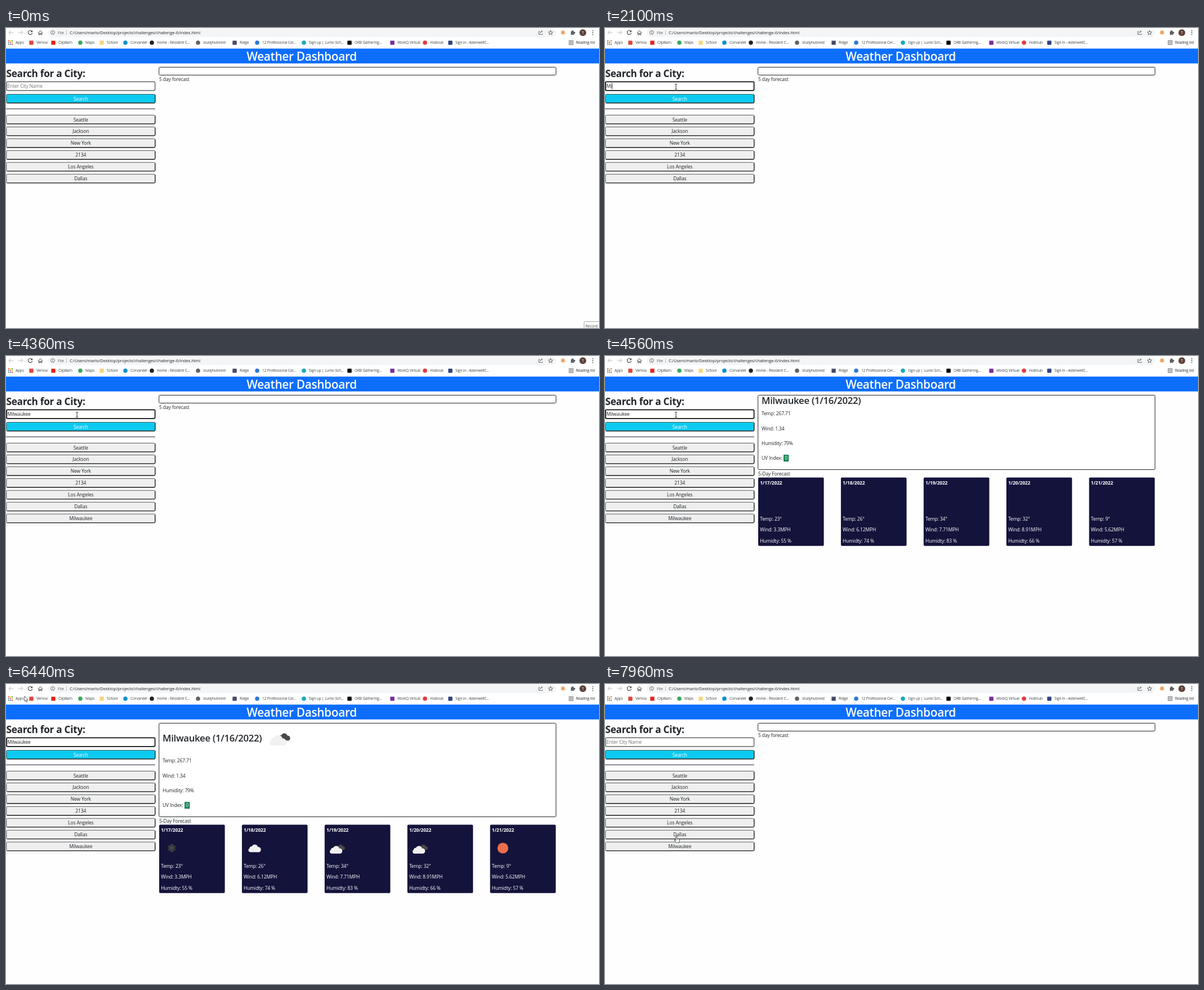
Recreate the animation shown at these times as an HTML page. Size 1053 by 532 pixels, loop 8 s.

```html
<!DOCTYPE html>
<html lang="en">
<head>
<meta charset="utf-8">
<title>Weather Dashboard</title>
<style>
html, body { margin: 0; width: 100%; height: 100%; overflow: hidden; background: #fefefe; }
svg { display: block; width: 100%; height: 100%; }
text { font-family: "Open Sans", "Noto Sans", sans-serif; letter-spacing: -.015em; white-space: pre; }
</style>
</head>
<body>
<svg id="stage" viewBox="0 0 1053 532"></svg>
<script>
const INK = '#212529';
const stage = document.getElementById('stage');

const text = (x, y, size, str, fill = INK, more = '') =>
  `<text x="${x}" y="${y}" font-size="${size}" fill="${fill}" ${more}>${str}</text>`;
const mid = (x, y, size, str, fill, more = '') => text(x, y, size, str, fill, 'text-anchor="middle" ' + more);
const rect = (x, y, w, h, fill, more = '') =>
  `<rect x="${x}" y="${y}" width="${w}" height="${h}" fill="${fill}" ${more}/>`;
const dot = (x, y, r, fill, more = '') => `<circle cx="${x}" cy="${y}" r="${r}" fill="${fill}" ${more}/>`;
const line = (d, color, width = 1, more = '') =>
  `<path d="${d}" fill="none" stroke="${color}" stroke-width="${width}" ${more}/>`;
const group = (id, body, more = '') => `<g id="${id}" ${more}>${body}</g>`;

// Browser toolbar and bookmarks
function toolbar() {
  const grey = '#5f6368', pale = '#b9bbbe';
  let s = rect(0, 0, 1053, 37, '#fff') + rect(74, 1, 903, 15, '#f4f5f6', 'rx="7.5"');
  s += line('M13 8H5M8.5 4.5L5 8L8.500 11.500', pale) + line('M22 8h8M26.500 4.500L30 8L26.500 11.500', pale);
  s += group('reload', line('M46 5.500A3.700 3.700 0 1 0 46.700 9', '#3c4043', 1.1) + '<path d="M47 3.700v3.600h-3.600z" fill="#3c4043"/>');
  s += group('stop', line('M40 5l6 6m0-6l-6 6', '#3c4043', 1.1));
  s += line('M57 8.500L61 4.500L65 8.500M58.300 8v4h1.800v-2.600h1.800V12h1.800V8', '#3c4043');
  s += dot(83, 8, 3.4, 'none', `stroke="${grey}" stroke-width=".9"`) + line('M83 7.500v2.300M83 5.800v.9', grey, .9);
  s += text(92, 10.7, 7.1, 'File', grey) + line('M107.500 4v8.500', '#aaadb1', .8);
  s += text(113, 10.7, 7.57, 'C:/Users/marlo/Desktop/projects/challenges/challenge-6/index.html', '#26282c');
  s += line('M948 6h-2v5.500h6.500v-1.500M948 9.500q.5-3.500 4-3.500m-1.500-2l2 2l-2 2', grey, .9);
  s += line('M967 4.200l1.100 2.700 2.900.2-2.200 1.900.7 2.800-2.500-1.500-2.500 1.500.7-2.800-2.200-1.900 2.900-.2z', '#3c4043', .8);
  s += dot(989, 8, 3.5, '#f0a367');
  s += rect(1003, 6, 6, 6, grey, 'rx=".7"') + dot(1006, 5.500, 1.5, grey) + dot(1009.500, 8.500, 1.4, grey);
  s += dot(1024.300, 8.300, 6, '#5d4038') + mid(1024.300, 10.700, 6.5, 'T', '#fff');
  for (const y of [4.8, 8.2, 11.6]) s += dot(1042, y, .9, '#3c4043');

  const dots = ['#ea4335', '#fbbc05', '#34a853', '#4285f4'];
  for (let i = 0; i < 9; i++) s += rect(4 + i % 3 * 3, 22 + (i / 3 | 0) * 3, 1.9, 1.9, dots[i % 4]);
  const marks = [
    [17, 'Apps'],
    [54, 'Vemox', '#e0453a'], [93, 'ClipBarn', '#e52420'], [141, 'Maps', '#3aa757', 1],
    [179, 'School', '#f6d67c'], [221, 'Corvandel', '#0a8fd3', 1], [268, 'Home - Resident C...', '#222', 1],
    [350, 'studyhubnest', '#5f6368', 1], [415, 'Ridge', '#45496a'], [455, '12 Professional Cer...', '#2d78d6', 1],
    [538, 'Sign up | Lumo Sch...', '#16a8bd', 1], [619, 'ORB Gathering...', '#000'],
    [695, 'WorkQ Virtual', '#7c2a9b'], [753, 'Hobnub', '#e4393f', 1], [798, 'Sign in - AlderwellC...', '#33407f']
  ];
  for (const [x, name, color, round] of marks) {
    if (color) s += round ? dot(x - 9, 26, 3.8, color) : rect(x - 12.700, 22.500, 7.4, 7.2, color, 'rx=".6"');
    s += text(x, 28.300, 6.45, name, '#3c4043');
  }
  s += rect(1000, 22.500, 7, 7, 'none', 'stroke="#5f6368" stroke-width=".9"');
  s += line('M1001 24.500h5M1001 26h5M1001 27.500h5', '#5f6368', .7);
  return s + text(1012, 28.300, 6.5, 'Reading list', '#26282c');
}

function button(y, label, fill = '#efefef', color = INK) {
  return rect(.8, y + .5, 264, 15.5, fill, 'rx="2" stroke="#55585b"') +
    line(`M1.500 ${y + 16}H263q1.800 0 1.800-1.800V${y + 1.5}`, '#111', 1.1) +
    mid(132.800, y + 11.5, 8.5, label, color);
}

// Weather icons, drawn around their own centre
const cloud = (fill, place = '') => `<path transform="${place}" fill="${fill}"
  d="M-11 9a5 5 0 0 1-1-9.500a4 4 0 0 1 5-4a8 8 0 0 1 15 1a6.500 6.500 0 0 1 3 12.500z"/>`;
const at = (x, y, scale, body) => `<g transform="translate(${x} ${y}) scale(${scale})">${body}</g>`;
const broken = cloud('#484848', 'translate(11 -6) scale(.7)') + cloud('#f1f1f1');
function flake() {
  let s = '';
  for (let a = 0; a < 360; a += 60)
    s += line('M0 0V-7.500M-2.500-6.500L0-4L2.500-6.500M-2-3.500L0-1.500L2-3.500', '#484848', 1.3, `transform="rotate(${a})"`);
  return s;
}

function card(i, [temp, wind, wet, icon]) {
  const x = 272 + i * 146.9;
  const rows = [`Temp: ${temp}°`, `Wind: ${wind}MPH`, `Humidty: ${wet} %`];
  return rect(x, 249.500, 116.6, 121.2, '#14133b', 'rx="2"') +
    text(x + 3.2, 262, 8.4, `1/${17 + i}/2022`, '#fff', 'font-weight="700"') +
    `<g class="icon">${at(...icon)}</g>` +
    rows.map((r, k) => text(x + 3.2, 326 + k * 19.3, 8.5, r, '#fff')).join('');
}

function report() {
  const days = [
    [23, '3.3', 55, [294.3, 291, 1, flake()]],
    [26, '6.12', 74, [441.500, 291.500, .74, cloud('#f1f1f1')]],
    [34, '7.71', 83, [586, 294, .74, broken]],
    [32, '8.91', 66, [733, 294, .74, broken]],
    [9, '5.62', 57, [882.300, 291, 1, dot(0, 0, 9.6, '#ec6e4c')]]
  ];
  const rows = ['Temp: 267.71', 'Wind: 1.34', 'Humidity: 79%', 'UV Index:'];
  return text(278, 102, 16.7, 'Milwaukee (1/16/2022)', INK, 'id="city" font-weight="600"') +
    `<g class="icon">${at(483, 100, 1, broken)}</g>` +
    group('details', rows.map((r, i) => text(278, 139.200 + i * 26.4, 8.5, r)).join('') +
      rect(317, 209, 9.3, 12.3, '#198754', 'rx="1"') + mid(321.700, 218.400, 8.5, '0', '#fff') +
      text(272, 245.500, 8.5, '5-Day Forecast') + days.map((d, i) => card(i, d)).join(''));
}

const towns = ['Seattle', 'Jackson', 'New York', '2134', 'Los Angeles', 'Dallas', 'Milwaukee'];
const hints = ['Seattle', 'Jackson', 'asdkasd', 'New York', 'Dallas'];

stage.innerHTML = rect(0, 0, 1053, 532, '#fefefe') + toolbar() +
  rect(0, 36.500, 1053, 26.3, '#0d6efd') +
  mid(525, 58.200, 20.8, 'Weather Dashboard', '#fff', 'font-weight="600"') +
  text(.5, 87, 17.2, 'Search for a City:', INK, 'font-weight="700"') +
  rect(1, 95.300, 263.6, 15.5, '#fff', 'id="box" rx="2"') +
  text(2.500, 106.300, 8.5, '', '#222', 'id="field"') + rect(0, 97.500, .8, 11, '#000', 'id="caret"') +
  button(117, 'Search', '#0dcaf0', '#fff') + rect(0, 142.600, 265, 1.6, '#6f6d79') +
  towns.map((n, i) => group('town' + i, button(154 + i * 20.95, n))).join('') +
  rect(271.700, 69.500, 705, 14, '#fff', `id="panel" rx="2" stroke="${INK}"`) +
  text(272, 93.700, 8.5, '5 day forecast', INK, 'id="empty"') + group('report', report()) +
  group('list', rect(-1, 111, 108.5, 110.5, '#000', 'opacity=".08"') + rect(0, 111, 106.5, 109, '#fff') +
    line('M0 220H106.500V111', '#c9c9c9', .7) +
    hints.map((n, i) => text(7, 129.300 + i * 19.85, 7, n, '#111')).join('')) +
  group('record', rect(1026.500, 520.500, 30, 14, '#fbfbfb', 'stroke="#aaa" rx="1"') + text(1029, 531, 6.8, 'Record', '#555')) +
  group('cursor',
    group('arrow', '<path d="M0 0V9L2.100 7.100L3.500 10.200L4.900 9.600L3.500 6.500H6.300z" fill="#fff" stroke="#222" stroke-width=".7"/>') +
    group('beam', line('M-1.800-4H-.4L0-3.500L.4-4H1.800M0-3.500V4.500M-1.800 5H-.4L0 4.500L.4 5H1.800', '#111', .9)) +
    group('hand', `<path d="M-1 1Q0-.5 1 1V4.500L5 5.500Q6 6 5.800 7.500L4.500 12H-.5L-3.800 7.500Q-3.500 6-1 8z"
      fill="#fff" stroke="#222" stroke-width=".8"/>` + line('M1.100 7V5M3 7V5.200', '#222', .6)));

const $ = id => document.getElementById(id);
const show = (id, on) => $(id).setAttribute('display', on ? 'inline' : 'none');
const icons = [...document.querySelectorAll('.icon')];

// Moves advance in even steps through their way points
const STEP = 67;
const moves = [
  { start: 70, steps: 12, path: [[1038, 527], [850, 455], [560, 330], [310, 205], [175, 130], [132, 106], [126, 103.500]] },
  { start: 6040, steps: 13, path: [[126, 103.500], [92, 76], [46, 34], [29, 18], [18, 6], [32, 6], [42.500, 7.500]] },
  { start: 7500, steps: 8, path: [[42.500, 7.500], [60, 60], [88, 140], [115, 225], [126, 266], [128, 275]] }
];
function pointer(t) {
  const m = moves.filter(m => t >= m.start).pop();
  if (!m) return null;
  const part = Math.min(1, (Math.floor((t - m.start) / STEP) + 1) / m.steps) * (m.path.length - 1);
  const i = Math.min(Math.floor(part), m.path.length - 2), f = part - i;
  return m.path[i].map((a, k) => a + (m.path[i + 1][k] - a) * f);
}

const keys = [
  [1960, 'M'], [2090, 'Mi'], [2220, 'Mil'], [2350, 'Milw'], [2490, 'Milwa'], [2640, 'Milwau'],
  [2900, 'Milwaue'], [2960, 'Milwauek'], [3230, 'Milwaue'], [3360, 'Milwau'],
  [3500, 'Milwauk'], [3630, 'Milwauke'], [3760, 'Milwaukee']
];
const RELOAD = 7160;
const blinks = [1160, 1760, 1960, 4360, 4910, 5370, 5900, 6440, 6970, RELOAD];

function draw(t) {
  const focus = t >= 1160 && t < RELOAD;
  const typed = t < RELOAD ? (keys.filter(k => t >= k[0]).pop() || [0, ''])[1] : '';
  const field = $('field'), box = $('box');
  field.textContent = typed || 'Enter City Name';
  field.setAttribute('fill', typed ? '#222' : '#757575');
  box.setAttribute('stroke', focus ? '#101010' : '#45484b');
  box.setAttribute('stroke-width', focus ? 1.7 : 1.2);
  show('caret', blinks.filter(b => t >= b).length % 2);
  $('caret').setAttribute('x', typed ? 2.5 + field.getComputedTextLength() : 2.8);

  show('record', t < 70);
  show('list', t >= 1230 && t < 2030);
  show('town6', t >= 4090);

  const open = t >= 4560 && t < RELOAD, loaded = t >= 4910;
  const lift = loaded ? 0 : -34;
  show('report', open);
  show('empty', !open);
  $('panel').setAttribute('height', open ? 166 + lift : 14);
  $('city').setAttribute('y', 102 + lift / 2);
  $('details').setAttribute('transform', `translate(0 ${lift})`);
  for (const i of icons) i.setAttribute('display', loaded ? 'inline' : 'none');

  const busy = t >= 7030 && t < 7360;
  show('stop', busy);
  show('reload', !busy);

  const p = pointer(t);
  show('cursor', p);
  if (p) {
    const [x, y] = p;
    const inField = x < 265 && y > 95 && y < 111;
    const onButton = x < 265 && (y > 117 && y < 133 || y > 154 && y < 297);
    show('beam', inField);
    show('hand', onButton);
    show('arrow', !inField && !onButton);
    $('cursor').setAttribute('transform', `translate(${x} ${y})`);
  }
}

function tick() {
  draw(performance.now() % 8000);
  requestAnimationFrame(tick);
}
tick();
</script>
</body>
</html>
```
